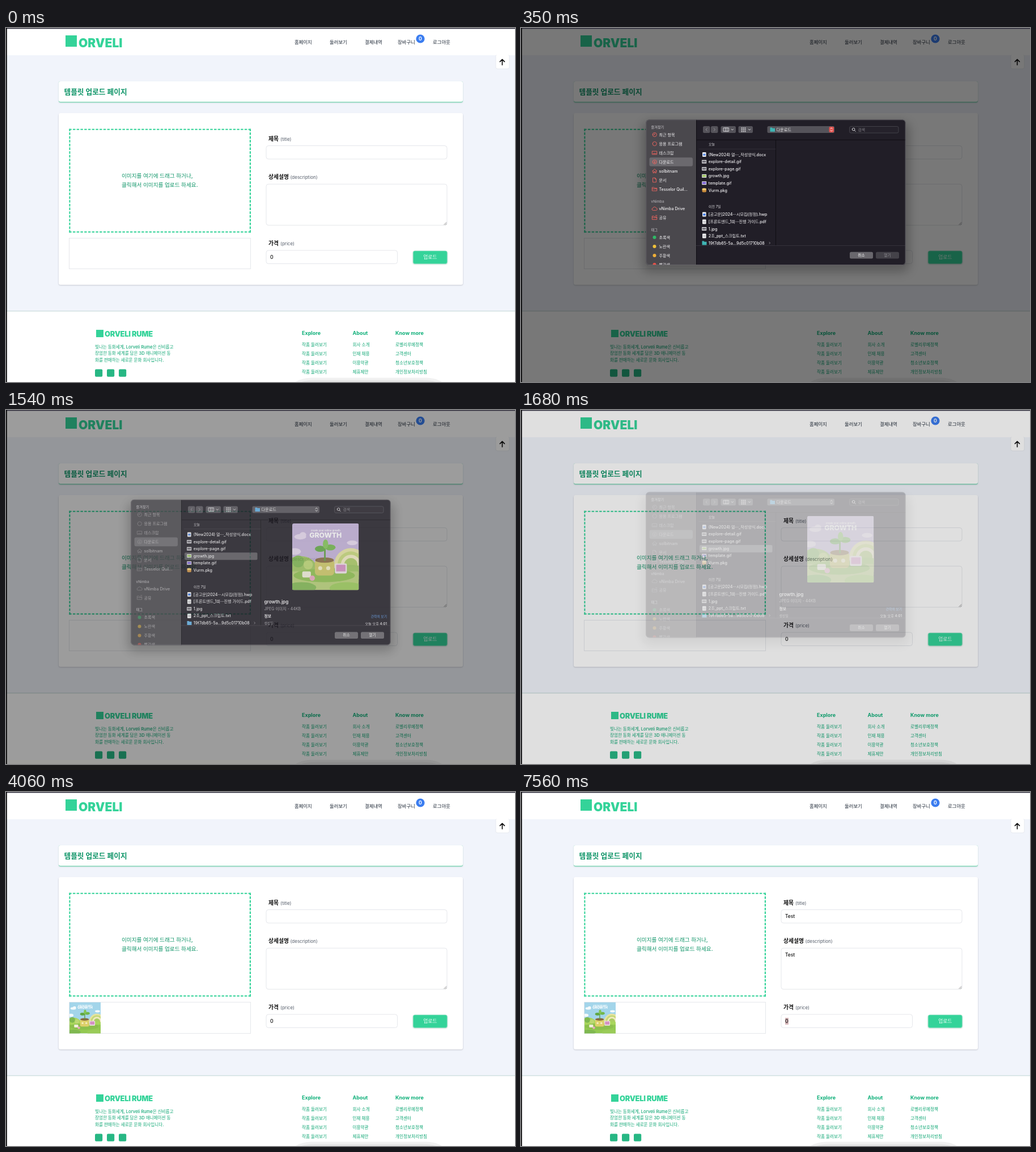
An HTML page for the animation above (8 s loop, 898 by 624 pixels).

```html
<!DOCTYPE html>
<html lang="ko">
<head>
<meta charset="utf-8">
<title>Template upload</title>
<style>
html, body { margin: 0; width: 100%; height: 100%; overflow: hidden; background: #fff; }
svg { display: block; width: 898px; height: 624px; }
text { font-family: Inter, "Noto Sans CJK KR", "Noto Sans CJK", sans-serif; white-space: pre; }
.line { fill: none; stroke-linecap: round; stroke-linejoin: round; }
.drop { box-sizing: border-box; width: 576px; height: 329px; border: 4px dashed #34d399; }
.big { --sky: #c3b1da; --cloud: #e6d8ee; --ground: #b5cf74; --hill: #9cc45c; --pot: #cfc864; }
.small { --sky: #a3d5ea; --cloud: #f4fafc; --ground: #93c951; --hill: #a9d65c; --pot: #ddd06a; }
#sheet .icons { stroke: #f0655f; }
#sheet .accent { fill: #e2504c; }
#sheet .folder { fill: #3fb5b4; }
#sheet.closing .icons { stroke: #9d9ba0; }
#sheet.closing .accent { fill: none; }
#sheet.closing .folder { fill: #5fb0e6; }
#sheet.closing .items { opacity: .55; }
</style>
</head>
<body>
<svg id="stage" viewBox="0 0 898 624" xmlns="http://www.w3.org/2000/svg"></svg>
<script>
const GREEN = '#34d399', DEEP = '#0f9568', LEAF = '#12a876';

const rect = (x, y, w, h, fill, r = 0, more = '') =>
  `<rect x="${x}" y="${y}" width="${w}" height="${h}" rx="${r}" fill="${fill}" ${more}/>`;
const frame = (x, y, w, h, stroke, r = 0, fill = '#fff', more = '') =>
  rect(x, y, w, h, fill, r, `stroke="${stroke}" ${more}`);
const line = (d, stroke, width = 1, more = '') =>
  `<path class="line" d="${d}" stroke="${stroke}" stroke-width="${width}" ${more}/>`;
const disc = (x, y, r, fill) => `<circle cx="${x}" cy="${y}" r="${r}" fill="${fill}"/>`;
const oval = (x, y, rx, ry, fill) => `<ellipse cx="${x}" cy="${y}" rx="${rx}" ry="${ry}" fill="${fill}"/>`;
// y is the optical middle of the line
const text = (x, y, size, fill, str, weight = 400, more = '') =>
  `<text x="${x}" y="${(y + size * .36).toFixed(2)}" font-size="${size}" font-weight="${weight}" fill="${fill}" ${more}>${str}</text>`;
const END = 'text-anchor="end"', MID = 'text-anchor="middle"';

function picture() {
  const sky = 'var(--sky)', cloud = 'var(--cloud)', hill = 'var(--hill)';
  return `<symbol id="picture" viewBox="0 0 100 100">` +
    rect(0, 0, 100, 100, sky) +
    oval(12, 20, 9, 4, cloud) + oval(16, 17, 5, 4, cloud) + oval(90, 29, 8, 3.5, cloud) + oval(4, 42, 9, 5, cloud) +
    [['#e6e3a0', 25], ['#c5d878', 20], ['#f0eac0', 15], ['#aacb62', 10]].map(([c, r]) => disc(88, 62, r, c)).join('') +
    oval(12, 66, 24, 17, hill) + oval(86, 76, 30, 14, hill) + disc(9, 57, 9, '#7fb850') + disc(24, 62, 7, '#bcd873') +
    rect(0, 72, 100, 28, 'var(--ground)') + oval(48, 78, 46, 10, '#8cbf4c') +
    rect(34, 54, 29, 24, 'var(--pot)', 5) + oval(48.5, 55, 14, 4, '#87693f') +
    line('M49 55V38', '#5d9c3c', 2.4) + oval(42, 38, 8, 4.5, '#5fa843') + oval(57, 36, 8, 4.5, '#70b64a') + oval(50, 31, 4, 7, '#82c456') +
    rect(64, 60, 18, 15, '#efe3e8', 2) + rect(66, 62, 14, 10, '#d590c4', 1) +
    disc(42, 67, 3, '#f4efc6') + disc(54, 67, 3, '#f4efc6') +
    rect(15, 72, 13, 9, '#f1efda', 2) + disc(30, 82, 4, '#e9a8c0') +
    oval(14, 96, 22, 8, '#7fb850') + oval(82, 97, 26, 9, '#9acb58') +
    text(50, 11, 3.6, '#fff', 'create your online growth', 600, MID) +
    text(50, 17.5, 10.5, '#fff', 'GROWTH', 800, MID) + '</symbol>';
}

function header() {
  const nav = [[509, '홈페이지'], [571, '둘러보기'], [633, '결제내역'], [691, '장바구니'], [753, '로그아웃']];
  return rect(0, 0, 898, 48, '#fff') + rect(105, 13, 20, 20, GREEN) +
    text(128, 26, 21, GREEN, 'ORVELI', 900) +
    nav.map(([x, s]) => text(x, 24.5, 8.4, '#1f2937', s, 500)).join('') +
    disc(731, 19, 7.6, '#3b7df0') + text(731, 19.2, 8.6, '#fff', '0', 700, MID) +
    frame(864, 46.5, 24, 25.5, '#e6eaf0', 3) + rect(863, 46, 26, 1.6, '#fff') +
    line('M875.5 65V55.5M871.5 59.3L875.5 55.3 879.5 59.3', '#111', 1.7);
}

function cards() {
  const label = (y, ko, x, en) => text(463, y, 9.8, '#111', ko, 700) + text(x, y + 1, 8, '#565e6b', en);
  return rect(93, 95, 713, 37, '#1f6b50', 3, 'opacity=".2" filter="url(#soft)"') +
    rect(93, 94, 713, 37.2, '#7ad6b4', 3) + rect(93, 94, 713, 36, '#fff', 3) +
    text(102.5, 112.3, 12.7, DEEP, '템플릿 업로드 페이지', 700) +
    rect(93, 151.5, 713, 302, '#223', 3, 'class="grow" opacity=".25" filter="url(#soft)"') +
    rect(93, 150, 713, 302.7, '#fff', 3, 'class="grow"') +
    '<foreignObject width="576" height="329" transform="translate(111.2 177.5) scale(.557)"><div class="drop"></div></foreignObject>' +
    text(204, 261, 9.64, DEEP, '이미지를 여기에 드래그 하거나,', 500) +
    text(204, 277, 9.64, DEEP, '클릭해서 이미지를 업로드 하세요.', 500) +
    frame(111.5, 370.5, 320, 54, '#e5e7eb', 0, '#fff', 'class="grow"') +
    '<use id="thumb" class="small" href="#picture" x="112" y="370.5" width="55" height="55"/>' +
    label(195, '제목', 484, '(title)') + label(262.3, '상세설명', 501.5, '(description)') + label(379, '가격', 484, '(price)') +
    frame(459, 207.5, 319, 23.5, '#e5e7eb', 4) + frame(459, 275.2, 319, 72.5, '#e5e7eb', 4, '#fff', 'id="area"') +
    line('M772.8 346.8L777 342.6M775.3 347L777.2 345', '#666', .7) +
    frame(459, 392, 231.5, 23.5, '#e5e7eb', 4) +
    rect(466, 398, 6, 12, '#d9babd', 0, 'id="picked"') +
    text(466, 219.3, 8.4, '#111', '', 500, 'id="title"') + text(466, 287, 8.4, '#111', '', 500, 'id="desc"') +
    text(466, 404, 8.8, '#111', '0', 500) + rect(466, 213, 1, 12, '#111', 0, 'id="caret"') +
    rect(718, 393.8, 60.5, 22.5, '#1c7a57', 3, 'opacity=".4" filter="url(#soft)"') +
    frame(718.4, 393, 59.8, 22.4, '#7fe0bc', 3, GREEN, 'stroke-width=".7"') +
    text(748.3, 404.3, 8.8, '#f2fdf8', '업로드', 500, MID);
}

function footer() {
  const columns = [
    [522, 'Explore', '작품 둘러보기', '작품 둘러보기', '작품 둘러보기', '작품 둘러보기'],
    [611.5, 'About', '회사 소개', '인재 채용', '이용약관', '제휴제안'],
    [687, 'Know more', '로벨리루메정책', '고객센터', '청소년보호정책', '개인정보처리방침']];
  const about = ['빛나는 동화세계, Lorveli Rume은 신비롭고', '장엄한 동화 세계를 담은 3D 애니메이션 동', '화를 판매하는 새로운 문화 회사입니다.'];
  return '<g id="foot">' + rect(0, 499, 898, 130, '#fff') + rect(0, 498.5, 898, 1, '#bfd5d4') +
    rect(159, 532, 13, 13, GREEN) + text(174, 539.5, 12.8, GREEN, 'ORVELI RUME', 900, 'letter-spacing="-.25"') +
    about.map((s, i) => text(157, 562 + i * 11.5, 7.55, LEAF, s, 500)).join('') +
    [157, 178, 199].map(x => rect(x, 601.5, 13.2, 13.2, '#27b784', 2)).join('') +
    columns.map(([x, head, ...rows]) => text(x, 537.5, 9, '#10b07a', head, 700) +
      rows.map((s, i) => text(x, 558.7 + i * 16, 7.6, LEAF, s, 500)).join('')).join('') + '</g>' +
    '<path d="M511 624Q522 616.5 540 616.5H740Q758 616.5 769 624Z" fill="#f1f1f1"/>' +
    '<path d="M521 624Q530 620.5 545 620.5H735Q750 620.5 759 624Z" fill="#e6e6e6"/>';
}

function sidebar() {
  const ring = 'M-3.6 0a3.6 3.6 0 1 0 7.2 0a3.6 3.6 0 1 0-7.2 0';
  const folder = 'M-4-3h3l1 1.2h4v4.8h-8zM-4-.4h8';
  const rows = [
    [188, '최근 항목', ring + 'M0-2V0H-1.8'],
    [204, '응용 프로그램', ring],
    [220, '데스크탑', 'M-4-2.8h8v5.6h-8zM-2.6 1.2h5.2'],
    [236, '다운로드', ring + 'M0-1.8V1.8M-1.4.5L0 1.8 1.4.5'],
    [252, 'solbitnam', 'M-4 .2L0-3.5 4 .2M-2.8-.6V3.4H-.9V1H.9V3.4H2.8V-.6'],
    [268, '문서', 'M-2.8-3.8H.8L2.8-1.8V3.8H-2.8zM.8-3.8V-1.8H2.8'],
    [284, 'Tesselor Quil...', folder],
    [318.8, 'vNimba Drive', 'M-2.5 2.6a2 2 0 0 1-.3-4a2.8 2.8 0 0 1 5.3-.2a2.1 2.1 0 0 1 0 4.2z'],
    [334.6, '공유', folder + 'M1.8-4.2h2.4']];
  const tags = [['초록색', '#2fb866'], ['노란색', '#f0c13a'], ['주황색', '#eeae38'], ['빨간색', '#ea5148']];
  const heads = [[174.3, '즐겨찾기'], [306, 'vNimba'], [355.5, '태그']];
  return rect(220, 161, 89.5, 258, '#4a484d') + rect(226.5, 228.2, 76.5, 15.6, '#6b696e', 3) +
    heads.map(([y, s]) => text(229.5, y, 6.2, '#a19fa4', s, 600)).join('') + '<g class="items">' +
    rows.map(([y, s, d]) => `<path class="line icons" d="${d}" stroke-width=".9" transform="translate(235.7 ${y})"/>` +
      text(243.5, y, 7.1, '#f3f2f4', s, 500)).join('') +
    tags.map(([s, c], i) => disc(235.5, 369 + i * 16, 3, c) + text(243.5, 369 + i * 16, 7.1, '#f3f2f4', s, 500)).join('') + '</g>';
}

function toolbar() {
  const chip = (x, w) => rect(x, 173, w, 12, '#55535a', 2.5);
  const grid = [0, 3, 6].map(y => line(`M388.6 ${176.3 + y}H396.6`, '#e6e5e8', 1.8, 'stroke-dasharray="1.8 1.2" style="stroke-linecap:butt"')).join('');
  return chip(321, 12.5) + chip(335, 12.5) + chip(352.5, 26.5) + chip(383.5, 25.5) + chip(434.5, 118.5) +
    line('M328.3 176.8L326 179 328.3 181.2M340.2 176.8L342.5 179 340.2 181.2', '#98969c', .9) +
    line('M357.5 176h9v6.2h-9zM360.5 176v6.2M363.5 176v6.2M371 178.2l1.8 1.8 1.8-1.8M401.3 178.2l1.8 1.8 1.8-1.8', '#e6e5e8', .9) + grid +
    '<path class="folder" d="M439.5 175.5h3.2l1 1.2h4.3v6h-8.5z"/>' + text(450.5, 179, 7.2, '#f3f2f4', '다운로드', 500) +
    rect(543.5, 174, 8.5, 10, 'none', 2, 'class="accent"') +
    line('M546 177.8l1.7-1.7 1.7 1.7M546 180.3l1.7 1.7 1.7-1.7', '#fff', .9) +
    frame(579.5, 173.5, 86.5, 11.5, '#4b4951', 2.5, '#25222b', 'stroke-width=".8"') +
    line('M584.3 178.6a2.3 2.3 0 1 0 4.6 0a2.3 2.3 0 1 0-4.6 0M588.3 180.4l2 2', '#e6e5e8', .9) +
    text(594.5, 179.2, 6.8, '#85838a', '검색');
}

function files() {
  const rows = [
    [223, '(New2024) 멀···_작성양식.docx', '#5b8de8'], [235.7, 'explore-detail.gif'], [248.2, 'explore-page.gif'],
    [260.8, 'growth.jpg', '#9cc45c'], [273.3, 'template.gif', '#7a5fd8'], [286, 'Vurm.pkg', 'box'],
    [328.6, '[공고문]2024···시모집(정정).hwp', '#3b78e8'], [341.4, '[프론트엔드_1회···진행 가이드.pdf', '#c9c9cc'],
    [354, '1.jpg'], [366.5, '2조_ppt_스크립트.txt', '#c9c9cc'], [379, '19f7db65-5a...9d5c01710b08', 'dir']];
  const icon = (y, kind) =>
    kind === 'box' ? rect(319.5, y - 2.5, 7.5, 6, '#c98c3c', 2) + oval(323.2, y - 2, 3.8, 1.8, '#f2cf74') :
    kind === 'dir' ? `<path class="folder" d="M319.5 ${y - 3.5}h3l1 1.2h4v5.8h-8z"/>` :
    /gif|#9c|#7a/.test(kind) ? rect(319.2, y - 3, 8, 6, '#e9e9ec') + rect(320, y - 1.8, 6.4, 3.4, kind === 'gif' ? '#6d6b74' : kind) :
    rect(320, y - 4, 6.6, 8, '#f2f2f4', 1) + rect(321.2, y - 1.5, 4.2, 3.5, kind);
  return text(331, 205.3, 6, '#d5d4d8', '오늘', 500) + text(331, 315.3, 6, '#d5d4d8', '이전 7일', 500) +
    line('M314 213.3H449', '#37343e', .8) + rect(315, 254.8, 128.5, 13, '#5c5a61', 2, 'id="row"') +
    rows.map(([y, s, kind = 'gif']) => icon(y, kind) + text(330.8, y, 7.1, '#f3f2f4', s, 500)).join('') +
    line('M438 377.4l1.5 1.6-1.5 1.6', '#a3a1a7', .8);
}

function sheet() {
  const info = '<g clip-path="url(#round)"><use class="big" href="#picture" x="505" y="203.6" width="117.5" height="117.5"/></g>' +
    text(455.5, 341.8, 8.2, '#f3f2f4', 'growth.jpg', 600) + text(455.5, 353.6, 7, '#a9a7ad', 'JPEG 이미지 - 44KB') +
    text(455.5, 367.3, 6.8, '#f3f2f4', '정보', 700) + text(672, 367.5, 5.8, '#5b9df0', '간략히 보기', 500, END) +
    text(455.5, 380, 5.8, '#a9a7ad', '생성일') + text(672, 380, 6.2, '#f3f2f4', '오늘 오후 4:01', 500, END);
  return '<g id="sheet">' + rect(214, 166, 471, 264, '#000', 14, 'opacity=".25" filter="url(#wide)"') +
    '<g clip-path="url(#window)">' + rect(220, 161, 459, 258, '#211e27') + sidebar() + toolbar() +
    line('M309.5 197.3H679M309.5 161V419M449.5 197.3V383.5', '#0f0d13', 1) +
    '<g clip-path="url(#list)">' + files() + `<g id="info">${info}</g></g>` +
    line('M309.5 383.5H679', '#3a3741', .8) +
    rect(580, 394.8, 41, 11.7, '#69676d', 2.5) + text(600.5, 400.6, 6.8, '#fff', '취소', 500, MID) +
    rect(626, 394.8, 41, 11.7, '#69676d', 2.5, 'id="open"') + text(646.5, 400.6, 6.8, '#fff', '열기', 500, MID + ' id="openText"') +
    '</g>' + frame(220.8, 161.8, 457.4, 255.8, '#6a686e', 5.5, 'none', 'stroke-width=".9"') + '</g>';
}

const stage = document.getElementById('stage');
stage.innerHTML = `<defs>
  <filter id="soft" x="-10%" y="-30%" width="120%" height="160%"><feGaussianBlur stdDeviation="1.3"/></filter>
  <filter id="wide" x="-20%" y="-20%" width="140%" height="140%"><feGaussianBlur stdDeviation="9"/></filter>
  <clipPath id="window">${rect(220.5, 161.5, 458, 256.5, '#000', 5.5)}</clipPath>
  <clipPath id="list">${rect(310, 197, 369, 186.5, '#000')}</clipPath>
  <clipPath id="round">${rect(505, 203.6, 117.5, 117.5, '#000', 3)}</clipPath>
  ${picture()}</defs>` +
  rect(0, 0, 898, 624, '#f1f4fb') + header() + cards() + footer() +
  rect(0, 0, 898, 624, '#000', 0, 'id="dim"') + sheet() +
  rect(0, 0, 898, 1.4, '#2b2938') + rect(0, 0, 1.7, 624, '#050507');

const $ = id => document.getElementById(id);
const set = (el, attrs) => { for (const k in attrs) el.setAttribute(k, attrs[k]); };
const show = (el, on) => set(el, { visibility: on ? 'visible' : 'hidden' });
const at = (steps, t) => steps.reduce((last, s) => s[0] <= t ? s : last);

// time, page dimming, sheet opacity, sheet offset
const SHEET = [
  [0, 0, 0, 0], [210, .1, .2, -16], [280, .36, .72, -6], [350, .53, 1, 0], [420, .55, 1, 0],
  [1330, .54, 1, 0], [1400, .51, .97, -.5], [1470, .46, .9, -1.6], [1540, .39, .78, -3.6],
  [1610, .25, .52, -9.5], [1680, .125, .25, -16.8], [1750, .04, .09, -22], [1820, 0, 0, 0]];
// time, letters in title, letters in description, caret field
const FORM = [
  [0, 0, 0, ''], [2520, 0, 0, 'title'], [3010, 0, 0, ''], [3570, 0, 0, 'title'], [4060, 0, 0, ''],
  [4620, 0, 0, 'title'], [5110, 0, 0, ''], [5250, 1, 0, 'title'], [5320, 2, 0, 'title'],
  [5460, 3, 0, 'title'], [5530, 4, 0, 'title'], [5950, 4, 0, 'desc'], [6370, 4, 1, 'desc'],
  [6510, 4, 2, 'desc'], [6650, 4, 3, 'desc'], [6720, 4, 4, 'desc'], [7280, 4, 4, '']];
const WORD = 'Test', CARET = [466, 472, 476, 481, 483];
const growing = [...document.querySelectorAll('.grow')].map(el => [el, +el.getAttribute('height')]);

function draw(t) {
  const [, dim, alpha, dy] = at(SHEET, t);
  const chosen = t >= 1330, done = t >= 1820;
  set($('dim'), { opacity: dim });
  set($('sheet'), { opacity: alpha, transform: `translate(0 ${dy})`, class: chosen ? 'closing' : '' });
  show($('sheet'), alpha > 0);
  set($('row'), { opacity: t >= 1120 ? 1 : 0 });
  set($('info'), { opacity: chosen ? 1 : 0 });
  set($('open'), { opacity: chosen ? 1 : .5 });
  set($('openText'), { opacity: chosen ? 1 : .4 });

  show($('thumb'), done);
  growing.forEach(([el, h]) => set(el, { height: h + done }));
  set($('foot'), { transform: `translate(0 ${+done})` });

  const [, a, b, field] = at(FORM, t);
  $('title').textContent = WORD.slice(0, a);
  $('desc').textContent = WORD.slice(0, b);
  show($('caret'), field);
  set($('caret'), { x: CARET[field === 'desc' ? b : a], y: field === 'desc' ? 281 : 213 });
  set($('area'), { stroke: t >= 5950 && t < 7560 ? '#a8506a' : '#e5e7eb' });
  show($('picked'), t >= 7560);
}

const start = performance.now();
function tick() {
  draw((performance.now() - start) % 8000);
  requestAnimationFrame(tick);
}
tick();
</script>
</body>
</html>
```
